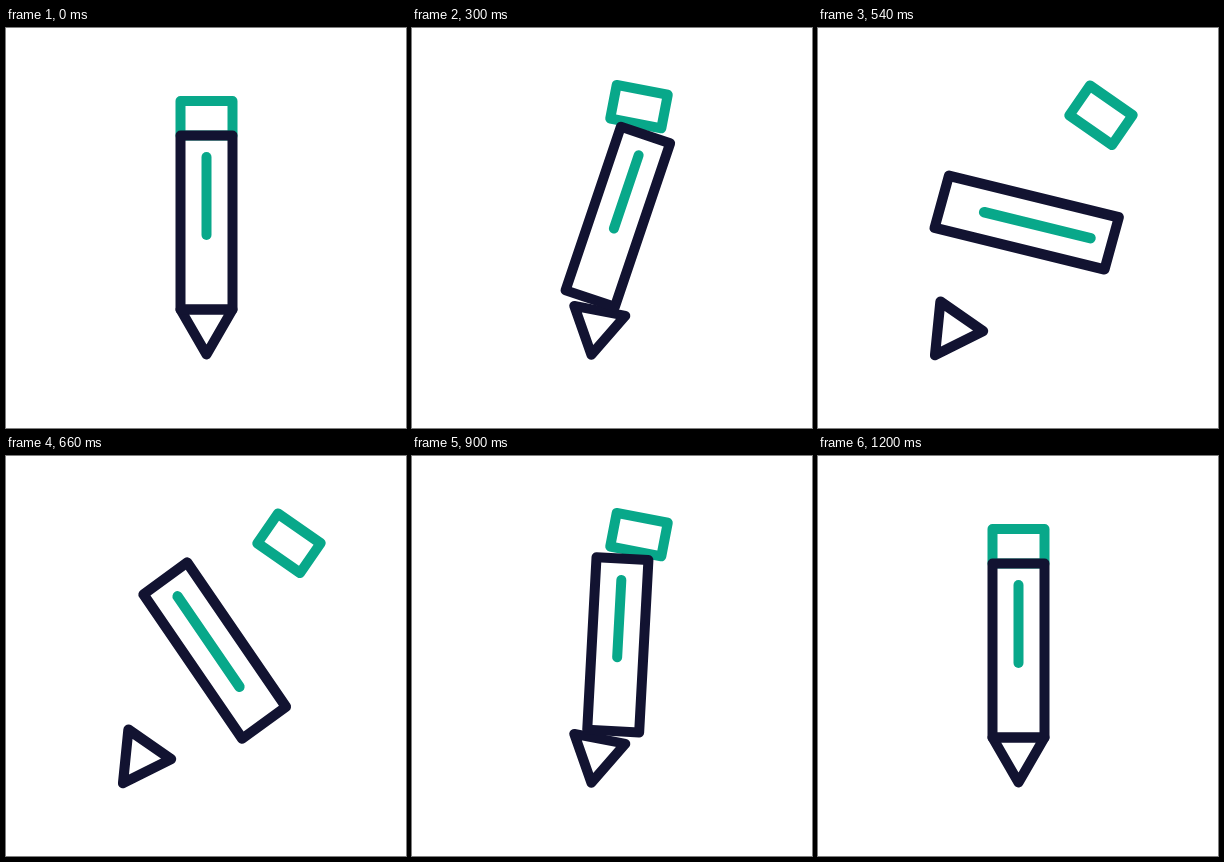
Animation of 400x400 px, one loop 1320 ms. Source, as an HTML page with a canvas:

```html
<!DOCTYPE html>
<html lang="en">
<head>
<meta charset="utf-8">
<title>Pencil</title>
<style>
html, body { margin: 0; width: 100%; height: 100%; overflow: hidden; background: #fff; }
canvas { display: block; }
</style>
</head>
<body>
<canvas width="400" height="400"></canvas>
<script>
const ctx = document.querySelector('canvas').getContext('2d');
const LOOP = 1320, END = 1200, STEP = 30;
const INK = '#121331', GREEN = '#08a88a';

// Key poses of the whole pencil: centre, tilt in degrees, stretch along its axis
const REST = { x: 200.5, y: 194.5, tilt: 0, stretch: 1 };
const SQUASH = { x: 203.7, y: 201.6, tilt: -6.9, stretch: 0.953 };
const BURST = { x: 208.7, y: 194.6, tilt: 34.7, stretch: 1.045 };

const rad = deg => deg * Math.PI / 180;
const mix = (a, b, p) => a + (b - a) * p;
const progress = (t, from, to) => Math.min(1, Math.max(0, (t - from) / (to - from)));
const smooth = (t, from, to) => {
  const x = progress(t, from, to);
  return x * x * (3 - 2 * x);
};
const launch = x => 1 - (1 - x ** 1.7) ** 5.6;

function blend(a, b, p) {
  const pose = {};
  for (const key in a) pose[key] = mix(a[key], b[key], p);
  return pose;
}

function stroke(color, points, closed = true) {
  ctx.beginPath();
  points.forEach(([x, y]) => ctx.lineTo(x, y));
  if (closed) ctx.closePath();
  ctx.strokeStyle = color;
  ctx.stroke();
}

const box = (top, bottom) => [[-26, top], [26, top], [26, bottom], [-26, bottom]];

function draw(t) {
  const there = Math.min(t, END - t); // the way back mirrors the way out
  const apart = launch(progress(there, 200, 600));
  const pose = there < 200
    ? blend(REST, SQUASH, smooth(there, 0, 200))
    : blend(SQUASH, BURST, apart);
  const hop = 40 * apart * (1 - apart);

  ctx.setTransform(1, 0, 0, 1, 0, 0);
  ctx.clearRect(0, 0, 400, 400);
  ctx.lineWidth = 10;
  ctx.lineCap = ctx.lineJoin = 'round';
  ctx.translate(pose.x, pose.y - hop);
  ctx.rotate(rad(pose.tilt));
  ctx.scale(1, pose.stretch);

  const lift = 20.7 * apart, drop = 22.2 * apart;
  stroke(GREEN, box(-121.5 - lift, -87 - lift));
  stroke(INK, [[-26, 87 + drop], [26, 87 + drop], [0, 132 + drop]]);

  // The body makes a half turn while its line slides to the other end
  ctx.rotate(Math.PI * smooth(t, 200, 1000));
  stroke(INK, box(-87, 87));
  const head = mix(-65.5, -12.5, smooth(t, 550, 800));
  const tail = mix(12.5, 65.5, smooth(t, 400, 650));
  stroke(GREEN, [[0, head], [0, tail]], false);
}

const start = performance.now();
function frame() {
  const t = (performance.now() - start) % LOOP;
  draw(Math.min(END, Math.floor(t / STEP) * STEP));
  requestAnimationFrame(frame);
}
frame();
</script>
</body>
</html>
```
